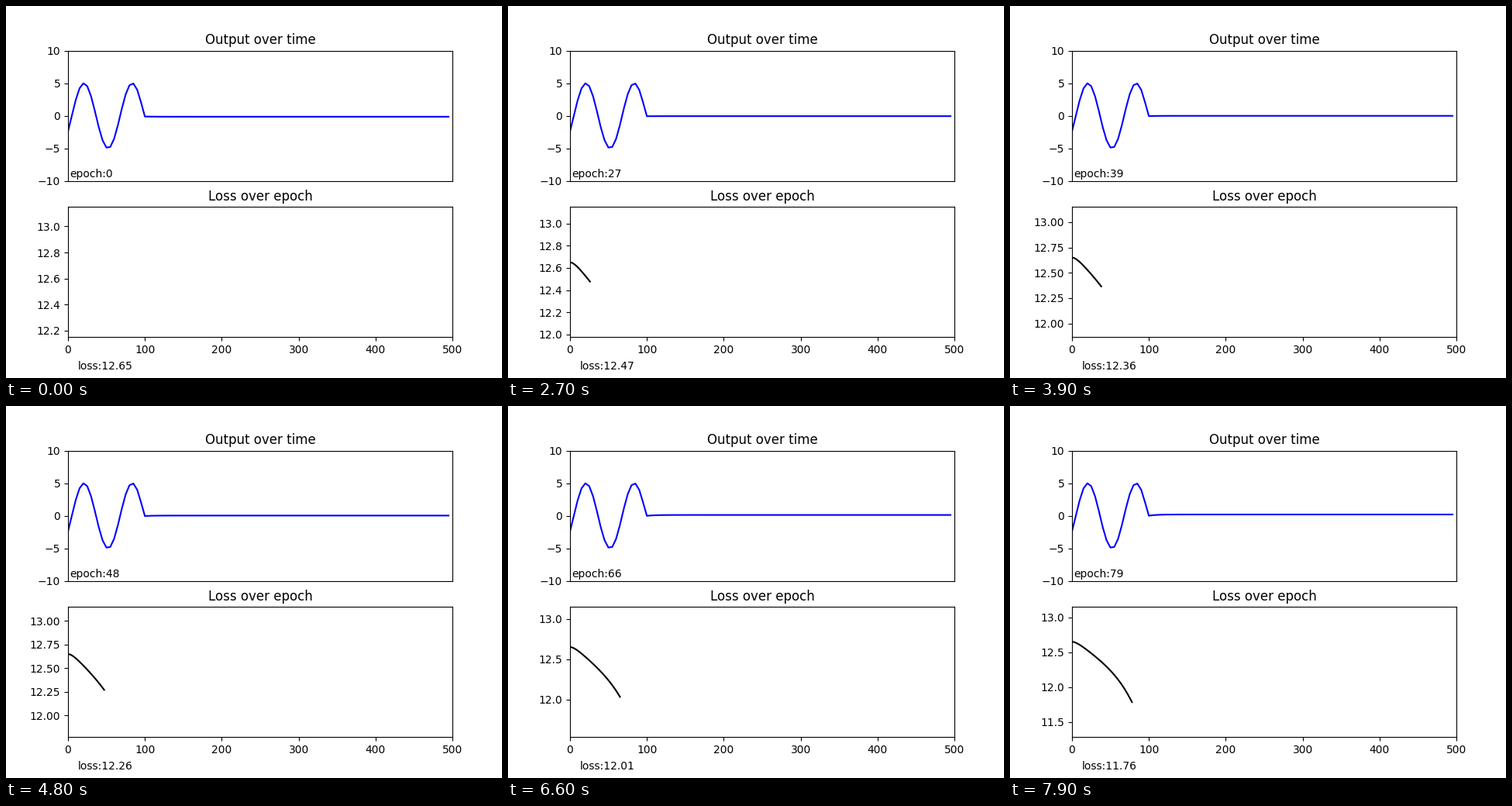
Recreate the animation shown at these times as a matplotlib script. Size 640 px wide and 480 px high, loop 8 s.

```python
import numpy as np
import matplotlib.pyplot as plt
from matplotlib.animation import FuncAnimation

W, H, DPI = 640, 480, 100
EPOCHS = 80
SEED_END = 100  # the model continues the sine from here


def loss_at(n):
    """Slow warm-up, steady descent, then an accelerating drop."""
    steady = 0.0085 * (n - 6 * (1 - np.exp(-n / 6)))
    return 12.65 - steady - 0.2665 * (n / 79) ** 4.2


def output_at(n):
    """Known sine followed by the prediction settling to a constant."""
    first = -0.12 + 0.0016 * n
    settled = -0.15 + 0.0026 * n + 0.000022 * n ** 2
    tail = settled + (first - settled) * np.exp(-(t - SEED_END) / 10)
    return np.where(t < SEED_END, 5 * np.sin((t - 5) / 10), tail)


def label(x, y):
    return fig.text(x / W, 1 - y / H, "", fontsize=10)


plt.rcParams["font.family"] = "DejaVu Sans"
t = np.arange(0, 500, 5)
epochs = np.arange(EPOCHS)
losses = loss_at(epochs)

fig, (top, bottom) = plt.subplots(2, 1, figsize=(W / DPI, H / DPI), dpi=DPI)
top.set(title="Output over time", xlim=(0, 500), ylim=(-10, 10), xticks=[])
bottom.set(title="Loss over epoch", xlim=(0, 500))

output_line, = top.plot(t, output_at(0), color="blue", lw=1.5)
loss_line, = bottom.plot([], [], color="black", lw=1.5)
epoch_label = label(82, 221)
loss_label = label(93, 469)


def update(n):
    output_line.set_ydata(output_at(n))
    loss_line.set_data(epochs[:n], losses[:n])
    bottom.set_ylim(losses[max(n - 1, 0)] - 0.5, losses[0] + 0.5)
    epoch_label.set_text(f"epoch:{n}")
    loss_label.set_text(f"loss:{losses[n]:.2f}")
    return output_line, loss_line, epoch_label, loss_label


anim = FuncAnimation(fig, update, frames=EPOCHS, interval=100,
                     repeat=True, repeat_delay=0, blit=False)
plt.show()
```
